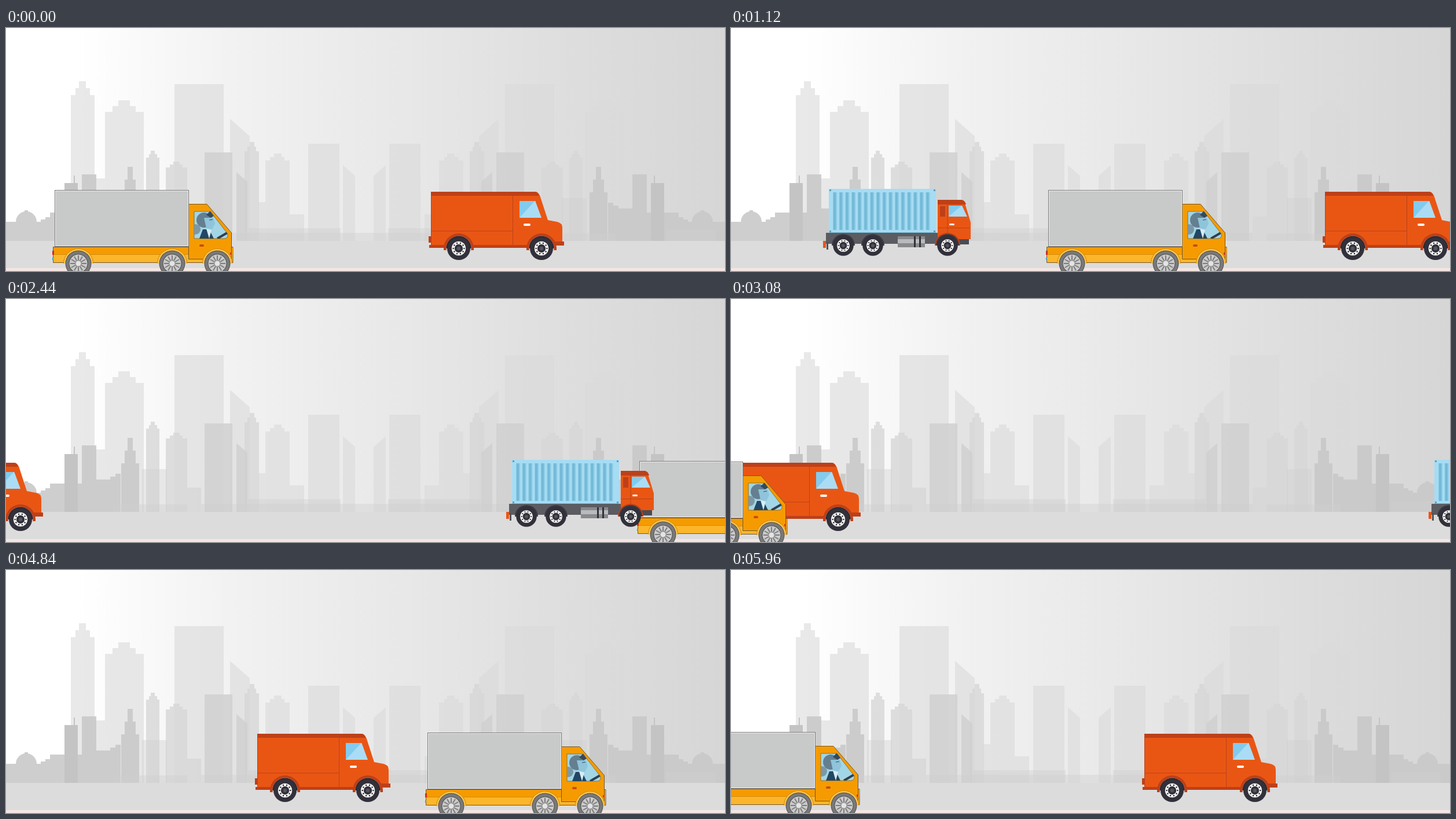
Write an HTML page with a canvas that moves like this. It is 1242 by 420 pixels and loops after 6 s.

```html
<!DOCTYPE html>
<html lang="en">
<head>
<meta charset="utf-8">
<title>City traffic</title>
<style>
  html, body { margin: 0; width: 100%; height: 100%; overflow: hidden; }
  canvas { display: block; width: 100vw; height: 100vh; }
</style>
</head>
<body>
<canvas id="stage" width="1242" height="420"></canvas>
<script>
const W = 1242, H = 420, GROUND = 368, LOOP = 6000, STEP = 40;
const stage = document.getElementById('stage').getContext('2d');
const city = document.createElement('canvas');
city.width = W;
city.height = H;
let c = city.getContext('2d');

const ORANGE = '#e95614', RUST = '#bd4019', TYRE = '#32303a', AMBER = '#f59b00', EDGE = '#75562a';
const PALE = 'rgba(219,219,219,.6)', SOFT = 'rgba(216,216,216,.8)', FAINT = 'rgba(205,205,205,.4)';
const MID = 'rgba(209,209,209,.85)', DARK = 'rgba(201,201,201,.9)';

function box(x, y, w, h, fill) {
  c.fillStyle = fill;
  c.fillRect(x, y, w, h);
}

function disc(x, y, r, fill, from = 0) {
  c.beginPath();
  c.arc(x, y, r, from, Math.PI * 2);
  c.fillStyle = fill;
  c.fill();
}

// Upper half of a disc
const arch = (x, y, r, fill) => disc(x, y, r, fill, Math.PI);

function line(x1, y1, x2, y2, color, width = 1) {
  c.beginPath();
  c.moveTo(x1, y1);
  c.lineTo(x2, y2);
  c.strokeStyle = color;
  c.lineWidth = width;
  c.stroke();
}

function path(d, fill, stroke) {
  const p = new Path2D(d);
  c.fillStyle = fill;
  c.fill(p);
  if (!stroke) return;
  c.strokeStyle = stroke;
  c.lineWidth = 1;
  c.stroke(p);
}

// Calls draw(dx, dy, i) for n directions around a circle
function around(n, draw) {
  for (let i = 0; i < n; i++) {
    const a = i * Math.PI * 2 / n;
    draw(Math.cos(a), Math.sin(a), i);
  }
}

const block = (x, w, top, fill) => box(x, top, w, GROUND - top, fill);

function slant(x, w, top, fill) {
  path(`M${x} ${top}L${x + w} ${top + w * .88}V${GROUND}H${x}Z`, fill);
}

// Three tiers, each wider than the one above
function tower(x, w, top, rise, fill) {
  c.beginPath();
  for (let i = 0; i < 3; i++) {
    const tier = w * [.3, .6, 1][i], y = top + rise * i;
    c.rect(Math.round(x + (w - tier) / 2), y, Math.round(tier), GROUND - y);
  }
  c.fillStyle = fill;
  c.fill();
}

// Low houses: strips that climb step by step to x
function stairs(x, w, top, rise, fill) {
  for (let i = 0; i < 3; i++) block(x + w * i, w, top - rise * i, fill);
}

function halfSkyline() {
  tower(112, 41, 92, 12, PALE);
  block(153, 18, 260, PALE);
  tower(171, 67, 125, 10, PALE);
  block(291, 85, 97, PALE);
  slant(387, 34, 157, PALE);
  tower(448, 42, 217, 6, PALE);
  block(436, 12, 301, PALE);
  block(490, 25, 322, PALE);
  block(522, 54, 200, PALE);
  slant(582, 21, 237, PALE);

  tower(412, 25, 197, 8, SOFT);
  tower(242, 23, 212, 6, SOFT);
  tower(276, 37, 231, 5, SOFT);
  block(313, 24, 326, SOFT);
  block(235, 43, 294, FAINT);
  block(343, 48, 215, MID);
  slant(398, 19, 249, MID);
  block(337, 282, 354, FAINT);
  block(418, 160, 346, FAINT);

  tower(199, 31, 240, 22, DARK);
  stairs(171, 9, 312, 5, DARK);
  block(156, 15, 312, DARK);
  block(131, 25, 253, DARK);
  block(101, 23, 268, '#c4c4c4');
  box(117, 255, 2, 13, '#c4c4c4');
  stairs(52, 8, 335, 4, DARK);
  block(76, 25, 319, DARK);
  block(124, 7, 319, DARK);
  block(-4, 56, 335, DARK);
  arch(35, 335, 18, DARK);
  box(32, 315, 6, 3, DARK);
  block(185, 128, 355, FAINT);
  block(12, 86, 349, FAINT);
}

function paintCity() {
  const sky = c.createLinearGradient(125, 0, W, 0);
  ['#fff', '#f1f1f1', '#e8e8e8', '#dedede', '#d6d6d6'].forEach((tone, i) => sky.addColorStop(i / 4, tone));
  box(0, 0, W, H, sky);
  halfSkyline();
  c.save();
  c.translate(W - 4, 0);
  c.scale(-1, 1);
  halfSkyline();
  c.restore();
  box(0, GROUND, W, 47, '#dcdcdc');
  box(0, 415, W, 5, '#f4e5e3');
}

function wheel(x, y, r) {
  disc(x, y, r, TYRE);
  disc(x, y, r * .61, '#f4f4f4');
  around(10, (dx, dy) => disc(x + dx * r * .47, y + dy * r * .47, r * .06, '#222'));
  disc(x, y, r * .36, TYRE);
  disc(x, y, r * .16, '#55535b');
}

function spokedWheel(x, y) {
  ['#4e4e4e', '#797979', '#4d4d4d', '#cbcbcb'].forEach((tone, i) => disc(x, y, [22.5, 21.5, 16.5, 15.5][i], tone));
  around(12, (dx, dy) => line(x + dx * 6, y + dy * 6, x + dx * 14, y + dy * 14, '#7c7c7c', 2));
  disc(x, y, 6, '#8f8f8f');
  disc(x, y, 4.5, '#e4e4e4');
}

// Sloped side window with a bright reflection
function glass(x, y, w, h) {
  path(`M${x} ${y}h${w * .72}l${w * .28} ${h}h${-w}Z`, '#abdcf5');
  path(`M${x} ${y}h${w * .7}L${x} ${y + h}Z`, '#82cbee');
}

function handle(x, y, w, h, fill) {
  c.beginPath();
  c.roundRect(x, y, w, h, h / 2);
  c.fillStyle = fill;
  c.fill();
}

// Vehicles are drawn from the top left corner of their load
function van() {
  path('M0 0H180Q187 0 190 12L202 49L218 52Q227 54 227 62V93H0Z', ORANGE);
  path('M0 0H180Q185 0 187 7H0Z', RUST);
  line(.5, 0, .5, 93, RUST);
  line(0, 68, 141, 68, RUST);
  line(141.5, 7, 141.5, 97, RUST);
  box(-4, 77, 5, 11, RUST);
  box(-3, 92, 171, 5, RUST);
  box(214, 86, 16, 7, RUST);
  for (const x of [48, 191]) {
    box(x - 26, 96, 52, 5, RUST);
    arch(x, 98, 26, RUST);
    disc(x, 98, 21.5, '#dcdcdc');
    arch(x, 98, 21.5, '#24222a');
    wheel(x, 98, 20);
  }
  glass(153, 16, 38, 29);
  handle(160, 55, 12, 4, '#fff');
}

function driver() {
  const pane = 'M241 37H269L299 76Q300 84 293 84H241Z';
  path(pane, '#a2d5e6', '#927029');
  c.save();
  c.clip(new Path2D(pane));
  disc(243, 68, 9, '#7c98a5');
  path('M250 84L256 68H267L275 84Z', '#214765');
  path('M262 67L267 84L271 69Z', '#d8edf4');
  disc(258, 52, 13, '#647f90');
  path('M258 48H274L277 58L272 68L262 66Z', '#8fc4da');
  path('M262 43L269 36L275 45L270 48Z', '#35495b');
  line(267, 52, 273, 51, '#35495b');
  line(281, 84, 298, 74, '#2c4054', 4);
  c.restore();
}

function boxTruck() {
  path('M-2.5 98.5H308V125.5H-2.5Z', '#fcb62b', EDGE);
  box(-2, 99, 310, 12, AMBER);
  line(-2, 111.5, 231, 111.5, '#d08a10');
  path('M231.5 24.5H263L305.5 74V119.5H231.5Z', AMBER, EDGE);
  for (const x of [41, 203, 281]) {
    arch(x, 127, 26, '#d18a0d');
    arch(x, 127, 25, '#ffc64f');
    spokedWheel(x, 127);
  }
  driver();
  handle(250, 94, 8, 4, '#c94b13');
  box(-4, 105, 3, 7, '#d52b20');
  box(-4, 117, 2, 4, '#38a5c4');
  box(303, 108, 3, 4, '#d8382a');
  ['#787878', '#f0f0f0', '#c8cac9'].forEach((tone, i) => box(i, i, 232 - 2 * i, 98 - 2 * i, tone));
}

function containerTruck() {
  box(-5, 76, 247, 19, '#5b5c62');
  box(-10, 90, 5, 12, ORANGE);
  box(-4, 92, 3, 13, '#515158');
  box(119, 82, 47, 19, '#898a8d');
  box(119, 87, 47, 7, '#b9babc');
  for (const x of [147, 156]) box(x, 82, 3, 19, TYRE);

  box(0, 0, 185, 76, '#a6dcf4');
  for (let i = 0; i < 16; i++) {
    box(7 + i * 10.7, 6, 7, 65, '#8ccbe5');
    box(8 + i * 10.7, 6, 4, 65, '#74b9d6');
  }
  line(0, 75.5, 185, 75.5, '#78bcd7');
  for (const x of [1, 181]) for (const y of [1, 72]) box(x, y, 3, 3, '#5c9fbd');

  path('M188 25H235L245 58V87H188Z', ORANGE);
  path('M188 19H230Q235 20 237 27H188Z', RUST);
  box(192, 30, 9, 18, RUST);
  line(205, 27, 205, 78, RUST);
  line(188, 67.5, 243, 67.5, RUST);
  glass(207, 29, 32, 19);
  handle(208, 60, 9, 3, '#fff');
  box(219, 87, 23, 9, '#4b4b52');
  arch(205, 98, 22, RUST);
  for (const x of [25, 76, 205]) {
    arch(x, 98, 20, '#3b3a42');
    wheel(x, 98, 17.8);
  }
}

function place(x, y, draw) {
  if (x < -330 || x > W + 15) return;
  c.save();
  c.translate(Math.round(x), y);
  draw();
  c.restore();
}

// Steady run that passes x at step n0
const run = (n, n0, x, speed) => x + speed * (n - n0);

const vanX = n => n < 50 ? run(n, 0, 734, 10.43) : run(n, 121, 434, 10);
const containerX = n => run(n, 28, 169, 21.35);

function boxTruckX(n) {
  if (n < 71) return run(n, 0, 84, 16.56);
  if (n < 146) return run(n, 121, 728, 21.35);
  return run(n, 149, -86, 85);
}

function frame() {
  const n = Math.floor((performance.now() - start) % LOOP / STEP);
  c.drawImage(city, 0, 0);
  place(vanX(n), 283, van);
  place(boxTruckX(n), n < 71 || n > 145 ? 280 : 281, boxTruck);
  place(containerX(n), 278, containerTruck);
  requestAnimationFrame(frame);
}

paintCity();
c = stage;
const start = performance.now();
frame();
</script>
</body>
</html>
```
